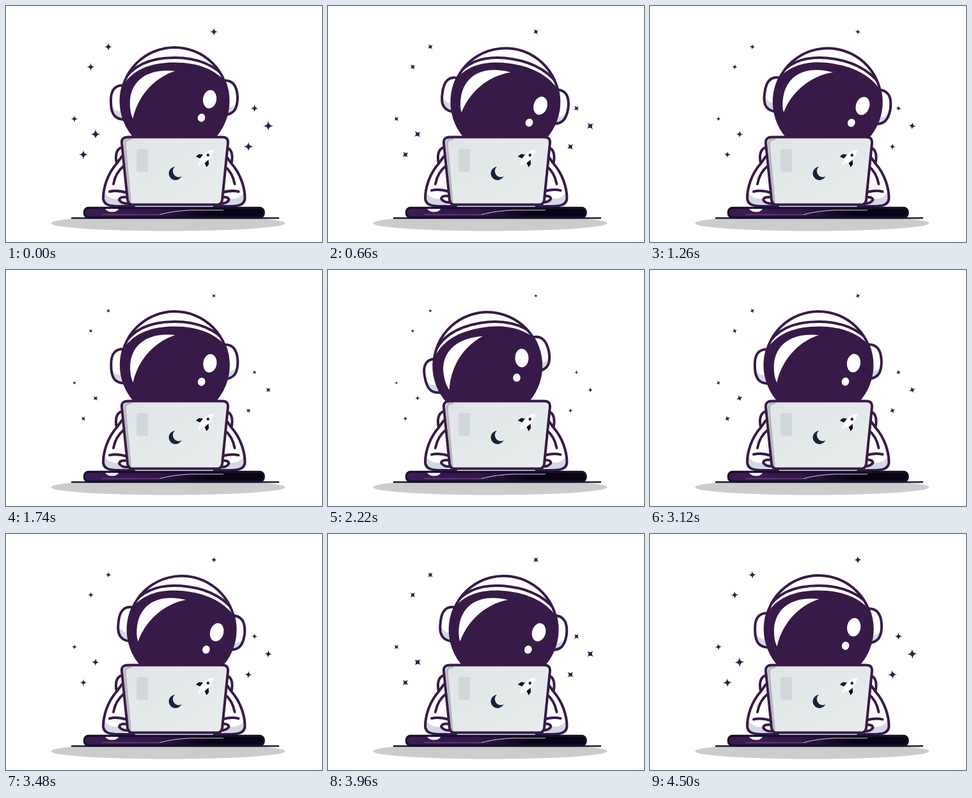
Write an HTML page that moves like this. It is 494x370 px and loops after 4.56 s.

```html
<!DOCTYPE html>
<html lang="en">
<head>
<meta charset="utf-8">
<title>Astronaut at a laptop</title>
<style>
  html, body { margin: 0; width: 100%; height: 100%; overflow: hidden; background: #fff; }
  svg { display: block; width: 494px; height: 370px; }
  .line { fill: none; stroke: #371a47; stroke-width: 4; stroke-linecap: round; stroke-linejoin: round; }
  .white { fill: #fff; }
  .shade { fill: #d3d8e5; }
  .dark { fill: #371a47; }
</style>
</head>
<body>
<svg viewBox="0 0 494 370">
  <defs>
    <linearGradient id="deskFill">
      <stop offset="0" stop-color="#3d1b55"/>
      <stop offset=".4" stop-color="#34164a"/>
      <stop offset=".7" stop-color="#0a0412"/>
    </linearGradient>
    <linearGradient id="lidFill" x2="1" y2="1">
      <stop offset="0" stop-color="#dfe4e6"/>
      <stop offset="1" stop-color="#e8eded"/>
    </linearGradient>
    <clipPath id="helmetClip"><circle cx="263.500" cy="149" r="84"/></clipPath>
    <path id="star" class="dark" d="M0-1Q.06-.06 1 0Q.06.06 0 1Q-.06.06-1 0Q-.06-.06 0-1Z"/>
    <path id="lid" d="M191 205.500H338Q348 205.500 347 215L338 304Q337 311.500 330 311.500H198Q191 311.500 190 304L181 215Q180 205.500 191 205.500Z"/>
    <g id="arm">
      <path class="white" d="M186 221C173 221 170 232 173 247C159 263 152 284 152 302C153 312 162 314 178 314H215V221Z"/>
      <path class="shade" d="M154 293C160 303 172 303 186 302V313H166C155 313 153 306 154 293Z"/>
      <path class="line" d="M186 221C173 221 170 232 173 247C159 263 152 284 152 302C153 312 162 314 178 314H200M173 247L181 236M185 250C176 257 170 268 168 279"/>
    </g>
    <g id="hand">
      <path class="white" d="M176 291H192V312L180 309Z"/>
      <path class="line" d="M162 291Q174 288 189 293M190 300Q178 298 177 304Q180 310 192 310"/>
    </g>
  </defs>

  <ellipse cx="253.500" cy="340.500" rx="183" ry="12.300" fill="#ccc"/>
  <path d="M102 332.500H427" stroke="#14213a" stroke-width="2.500"/>

  <use href="#arm"/>
  <use href="#arm" transform="matrix(-1 0 0 1 525.500 0)"/>
  <g id="leftHand"><use href="#hand"/></g>
  <g id="rightHand"><use href="#hand" transform="matrix(-1 0 0 1 525.500 0)"/></g>

  <g id="head">
    <path class="white" d="M188 125C171 122 163 131 164 151C164 172 172 179 190 178Z"/>
    <path class="shade" d="M165 155C170 165 178 167 188 165V178C173 179 166 171 165 155Z"/>
    <path class="line" d="M188 125C171 122 163 131 164 151C164 172 172 179 190 178"/>
    <path class="white" d="M338 117C354 115 361 124 362 143C362 162 356 170 340 171Z"/>
    <path class="shade" d="M362 147C359 156 353 159 344 160V171C357 170 362 162 362 147Z"/>
    <path class="line" d="M338 117C354 115 361 124 362 143C362 162 356 170 340 171"/>
    <circle class="white" cx="263.500" cy="149" r="84"/>
    <g clip-path="url(#helmetClip)">
      <path class="line" d="M182 121C197 92 228 81 264 81C299 81 328 93 345 115"/>
      <path class="dark" d="M178 133C194 99 227 88.500 264 88.500C302 88.500 333 101 351 129V240H178Z"/>
    </g>
    <circle class="line" cx="263.500" cy="149" r="84"/>
    <path class="white" d="M264 102C226 98 198 113 194 146C193 159 195 170 198.500 176.500C205 145 228 114 264 102Z"/>
    <ellipse class="white" cx="318.500" cy="146" rx="10.500" ry="14.500" transform="rotate(8 318 146)"/>
    <ellipse class="white" cx="305.500" cy="175" rx="5.800" ry="6.500" transform="rotate(15 305 175)"/>
  </g>

  <use href="#lid" fill="url(#lidFill)"/>
  <path d="M196 208.500Q185 208 186 218L194 308" fill="none" stroke="#b8b6be" stroke-width="3.500"/>
  <use href="#lid" class="line"/>
  <rect x="204" y="224" width="18" height="36" rx="4" fill="#d0d7da"/>
  <path d="M264 252A10.500 10.500 0 1 0 274.500 267A9.200 9.200 0 0 1 264 252Z" fill="#17243c"/>
  <g transform="translate(311.500 238) rotate(45)">
    <path d="M-5-2L-11 3L-12 9L-4 6ZM5-2L11 3L12 9L4 6Z" fill="#120b1c"/>
    <path class="white" d="M0-18C7-10 7 3 4 9H-4C-7 3-7-10 0-18ZM-3 10H3L0 17Z"/>
    <circle class="dark" cy="-6" r="2.300"/>
  </g>

  <rect x="122.500" y="316.500" width="280.500" height="15" rx="6.500" fill="url(#deskFill)" stroke="#15102c" stroke-width="3.500"/>
  <path d="M155 318H176Q174 323 166 323Q158 323 155 318Z" fill="#e9e7f0"/>
  <path d="M240 327Q262 321 290 320H340" fill="none" stroke="#d8d2e0" stroke-width="1"/>
  <path d="M150 327H240" stroke="#75588c" stroke-width="1"/>
  <g id="stars"></g>
</svg>
<script>
const LOOP = 4560, STEP = 60;
const $ = id => document.getElementById(id);

// x, y, arm length
const stars = [
  [325, 40.5, 6.2], [160, 64, 6.2], [132.5, 95.5, 6.2],
  [107, 177, 5.5], [140, 201, 7.8], [121, 233, 7.2],
  [388.5, 160.5, 6.2], [410, 188, 8], [379, 220.5, 7.4]
].map(([x, y, size]) => {
  const el = document.createElementNS('http://www.w3.org/2000/svg', 'use');
  el.setAttribute('href', '#star');
  $('stars').append(el);
  return { el, x, y, size };
});

// time, head tilt in degrees
const tilts = [[0, 0], [760, 9.8], [1200, 9.8], [2300, -9.9], [2500, -9.9], [3720, 9.3], [4560, 0]];

function tiltAt(t) {
  const i = tilts.findIndex(key => key[0] > t);
  const [t0, a] = tilts[i - 1], [t1, b] = tilts[i];
  return a + (b - a) * (1 - Math.cos(Math.PI * (t - t0) / (t1 - t0))) / 2;
}

function draw(now) {
  const t = Math.floor(now % LOOP / STEP) * STEP;
  const p = t / LOOP;
  $('head').setAttribute('transform', `rotate(${tiltAt(t)} 263 234)`);

  const scale = 0.5 + Math.abs(p - 0.5);
  for (const s of stars)
    s.el.setAttribute('transform', `translate(${s.x} ${s.y}) rotate(${p * 360}) scale(${s.size * scale})`);

  const tap = Math.cos(p * 22 * Math.PI) - 1;
  for (const hand of ['leftHand', 'rightHand'])
    $(hand).setAttribute('transform', `translate(0 ${tap})`);
  requestAnimationFrame(draw);
}
draw(performance.now());
</script>
</body>
</html>
```
